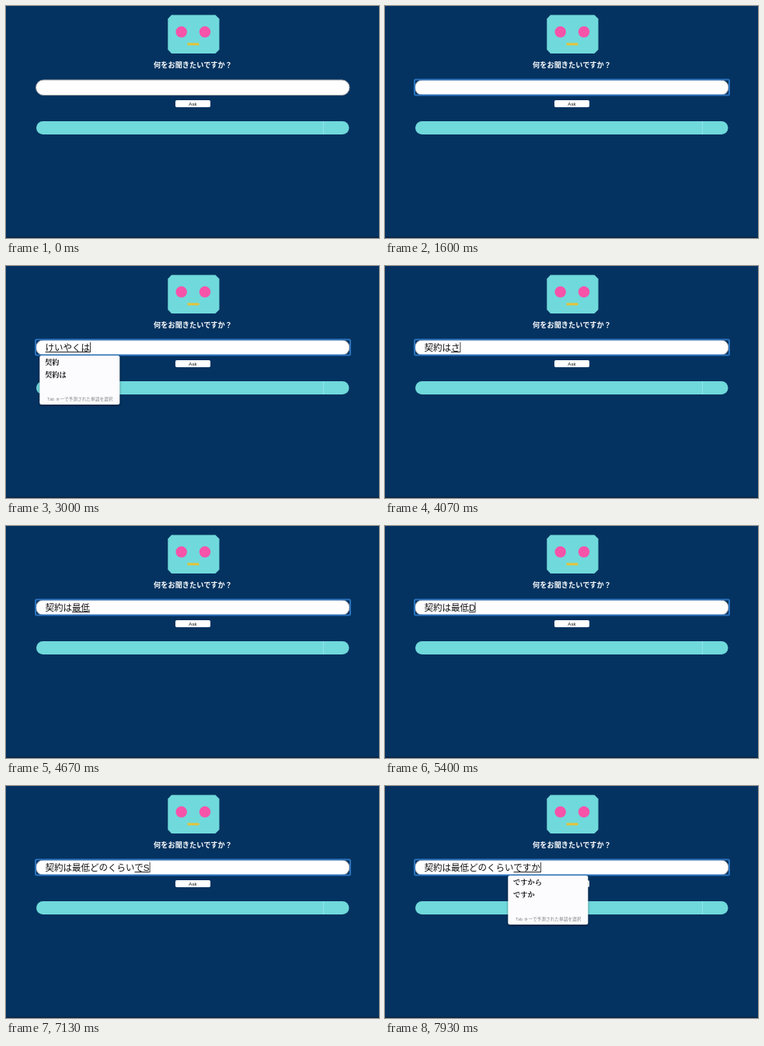
An HTML page for the animation above (8000 ms loop, 480x298 px).

```html
<!DOCTYPE html>
<html lang="ja">
<head>
<meta charset="utf-8">
<title>Chat prompt</title>
<style>
html, body { margin: 0; width: 100%; height: 100%; overflow: hidden; background: #043361; }
svg { display: block; width: 480px; height: 298px; }
text { font-family: "Liberation Sans", "Noto Sans CJK JP", sans-serif; white-space: pre; }
.title { font-size: 9.2px; font-weight: 700; fill: #fff; text-anchor: middle; }
.ask { font-size: 6.2px; fill: #111; text-anchor: middle; }
.typed { font-size: 11.5px; fill: #111; }
.pick { font-family: "Noto Serif CJK JP", "Noto Sans CJK JP", serif; font-size: 9.2px; font-weight: 700; fill: #111; }
.hint { font-size: 5.7px; fill: #85878c; text-anchor: middle; }
#panel { filter: drop-shadow(0 1px 1.5px rgba(0, 0, 0, .45)); }
#ring { animation: focus 8s step-end infinite; }
@keyframes focus { 0% { opacity: 0; } 10.875% { opacity: 1; } }
</style>
</head>
<body>
<svg viewBox="0 0 480 298">
  <rect width="480" height="298" fill="#043361"/>
  <rect y="296.5" width="480" height="1.5" fill="#0a2747"/>

  <path d="M213 11.5h56.5l5 5v39.5l-5 5H213l-4.700-5V16.500z" fill="#70d9db"/>
  <circle cx="225.700" cy="33.300" r="7.200" fill="#f653a9"/>
  <circle cx="256" cy="33.300" r="7.200" fill="#f653a9"/>
  <rect x="233.500" y="47.500" width="15" height="3" fill="#e6c437"/>
  <text class="title" x="240.500" y="79">何をお聞きたいですか？</text>

  <rect x="38.500" y="95" width="403.500" height="19.500" rx="9.750" fill="#fff" stroke="#a5a5a8"/>
  <rect id="ring" x="38" y="94.500" width="405" height="20" rx="1.500" fill="none" stroke="#2c73bd" stroke-width="2"/>
  <text class="typed" x="50.500" y="108.700"><tspan id="done"></tspan><tspan id="draft"></tspan></text>
  <rect id="line" y="110" height="1" fill="#222"/>
  <rect id="caret" y="98" width=".8" height="13" fill="#111"/>

  <rect x="218" y="121" width="45" height="9" rx="1.800" fill="#fff"/>
  <text class="ask" x="240.500" y="127.800">Ask</text>

  <rect x="39" y="148" width="402.500" height="17" rx="8.500" fill="#70d9db"/>
  <rect x="408" y="148" width="1" height="17" fill="#8fe3f0"/>

  <g id="panel">
    <rect y="115" width="103" height="63" rx="2.500" fill="#fcfcfe"/>
    <text class="pick" id="pick1" x="6.800" y="126.800"></text>
    <text class="pick" id="pick2" x="6.800" y="143.300"></text>
    <text class="hint" x="52" y="173.300">Tab キーで予測された単語を選択</text>
  </g>
</svg>
<script>
const LOOP = 8000, FOCUS = 870, LEFT = 50.5, EM = 11.5;
const $ = id => document.getElementById(id);
const [done, draft, line, caret, panel, pick1, pick2] =
  ["done", "draft", "line", "caret", "panel", "pick1", "pick2"].map($);

const contract = ["契約", "契約は"];
const minimum = ["最低", "最低限"];
const howMuch = ["どのくらい", "どの区"];
const ending = ["ですから", "ですか"];

// time, committed text, text being composed, suggestions
const A = "契約は", B = A + "最低", C = B + "どのくらい";
const steps = [
  [0, "", ""],
  [1870, "", "K"], [2000, "", "け"], [2130, "", "けい"],
  [2270, "", "けい", contract], [2400, "", "けいY", contract],
  [2530, "", "けいや", contract], [2600, "", "けいやK", contract],
  [2730, "", "けいやく", contract], [2930, "", "けいやくH", contract],
  [3000, "", "けいやくは", contract], [3270, "", A], [3530, A, ""],
  [3930, A, "S"], [4000, A, "さ"], [4130, A, "さい"],
  [4200, A, "さいT", minimum], [4330, A, "さいて", minimum],
  [4400, A, "さいてい", minimum], [4530, A, "最低"],
  [5330, B, ""], [5400, B, "D"], [5530, B, "ど"], [5670, B, "どN"],
  [5800, B, "どの"], [5930, B, "どのK", howMuch], [6000, B, "どのく", howMuch],
  [6270, B, "どのくらい"], [6470, C, ""],
  [6870, C, "D"], [7000, C, "で"], [7130, C, "でS"], [7200, C, "です"],
  [7330, C, "です", ending], [7470, C, "ですK", ending], [7670, C, "ですか", ending]
];

const width = s => [...s].reduce((w, c) => w + (c < "\u0080" ? EM * .667 : EM), 0);
const show = (el, on) => el.setAttribute("visibility", on ? "visible" : "hidden");

let last;
function render(step) {
  const [, fixed, text, picks] = step;
  const x = LEFT + width(fixed), w = width(text);
  done.textContent = fixed;
  draft.textContent = text;
  line.setAttribute("x", x);
  line.setAttribute("width", w);
  caret.setAttribute("x", x + w);
  show(panel, picks);
  if (picks) {
    panel.setAttribute("transform", `translate(${x - 7.2} 0)`);
    [pick1.textContent, pick2.textContent] = picks;
  }
}

function tick() {
  const t = performance.now() % LOOP;
  const step = steps.findLast(s => s[0] <= t);
  if (step !== last) render(last = step);
  const converted = /[契最]/.test(step[2]);
  const blink = step[2] !== "" || (t - Math.max(FOCUS, step[0])) % 1000 < 500;
  show(caret, t >= FOCUS && !converted && blink);
  requestAnimationFrame(tick);
}
tick();
</script>
</body>
</html>
```
